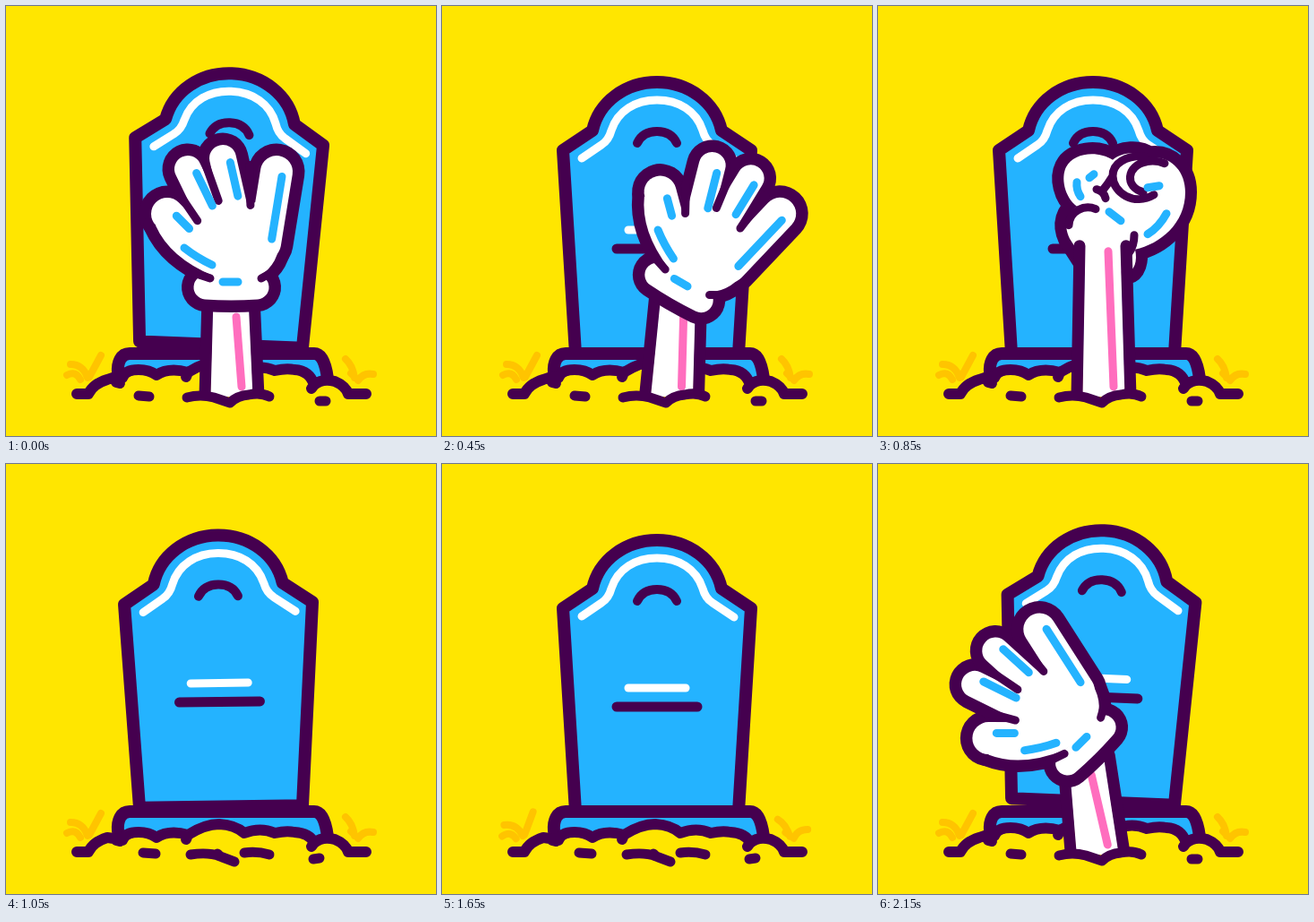
Animation, 480 px wide and 480 px high, one loop 2.2 s. Source, as an HTML page with a canvas:

```html
<!DOCTYPE html>
<html lang="en">
<head>
<meta charset="utf-8">
<title>Hand from the grave</title>
<style>
  html, body { margin: 0; width: 100%; height: 100%; overflow: hidden; background: #ffe600 }
  canvas { display: block; width: 480px; height: 480px }
</style>
</head>
<body>
<canvas id="stage" width="480" height="480"></canvas>
<script>
const LOOP = 2200, STEP = 50, BURST = 1700;
const YELLOW = '#ffe600', DARK = '#45004f', BLUE = '#24b3ff',
      WHITE = '#fff', PINK = '#ff6ebe', GRASS = '#ffc400';
const ctx = document.getElementById('stage').getContext('2d');
ctx.lineCap = ctx.lineJoin = 'round';

const stroke = (d, color, width) => {
  ctx.strokeStyle = color;
  ctx.lineWidth = width;
  ctx.stroke(new Path2D(d));
};
const fill = (d, color) => {
  ctx.fillStyle = color;
  ctx.fill(new Path2D(d));
};
const line = (a, b, color, width) => stroke(`M${a}L${b}`, color, width);
const mix = (a, b, u) => a.map((v, i) => v + (b[i] - v) * u);

// Runs fn in its own coordinate system.
function at(x, y, degrees, fn) {
  ctx.save();
  ctx.translate(x, y);
  ctx.rotate(degrees * Math.PI / 180);
  fn();
  ctx.restore();
}

// Smooth step from 0 to 1, and smooth bump 0-1-0, between two times.
const span = (t, a, b) => Math.min(1, Math.max(0, (t - a) / (b - a)));
const ramp = (t, a, b) => { const u = span(t, a, b); return u * u * (3 - 2 * u); };
const bump = (t, a, b) => Math.sin(Math.PI * span(t, a, b)) ** 2;

// All times below count from the moment the hand bursts out.
function pose(age) {
  const hop = bump(age, 1500, 1800);
  const waving = ramp(age, 230, 420) * (1 - ramp(age, 950, 1150));
  const swing = 30 * Math.exp((950 - age) / 750);
  const angle = -swing * Math.cos((age - 410) / 360 * 2 * Math.PI) * waving;
  return {
    stoneY: 11 * bump(age, 0, 300) - 11 * bump(age, 200, 700) - 22 * hop,
    tilt: 2.4 * bump(age, 50, 850) - 3 * hop,
    sway: 10 * bump(age, 0, 300) - 9 * (bump(age, 1850, 2350) + bump(age, -350, 150)),
    angle,
    bend: Math.abs(angle) * (.22 + .002 * angle),
    curl: 1 - ramp(age, 150, 250) + ramp(age, 1050, 1200),
    x: 251 + .42 * angle - 7 * bump(age, 0, 300),
    y: 520 - 205 * ramp(age, -10, 170) - 112 * bump(age, 70, 350)
       - 48 * bump(age, 1050, 1700) + 230 * ramp(age, 1400, 1570),
    foot: 252 + .15 * angle,
    closing: age > 800
  };
}

function drawGrass(sway) {
  at(92, 420, sway, () =>
    stroke('M-24-8Q-14-13-9-3M-20-20Q-6-20-1-5M14-30Q8-19 1-6', GRASS, 8));
  at(392, 420, sway * 1.2, () =>
    stroke('M-13-26Q-5-19-3-5M18-9Q7-11 1-2M-7-10L-3-6', GRASS, 8));
}

function drawStone(dy, tilt) {
  at(240, 388 + dy, tilt, () => {
    ctx.translate(-240, -388);
    const slab = 'M149 388L135 161L168 139C175 107 205 85 240 85S305 107 312 139L345 161L331 388Z';
    fill(slab, BLUE);
    stroke(slab, DARK, 14);
    stroke('M156 170L178 155Q186 150 189 139C196 117 216 105 240 105S284 117 291 139Q294 150 302 155L326 171', WHITE, 9);
    stroke('M218 153Q224 140 240 140T262 153', DARK, 10);
    stroke('M208 250H272', WHITE, 9);
    stroke('M195 271H285', DARK, 11);
  });
  at(0, Math.max(0, dy) * .9, 0, () => {
    const base = 'M125 410C124 398 128 388 138 388H344C353 388 357 400 359 416';
    fill(base, BLUE);
    stroke(base, DARK, 14);
  });
}

// The soil heaps up a little while the arm stands in it.
function drawMound(lift) {
  const y = v => v - lift;
  const ridge = `M79 433H92Q97 422 113 417Q123 ${y(418)} 130 ${y(420)}Q133 ${y(411)} 148 ${y(411)}`
    + `Q160 ${y(411)} 168 ${y(417)}Q182 ${y(408)} 203 ${y(414)}Q222 ${y(402)} 238 ${y(402)}`
    + `Q256 ${y(403)} 266 ${y(412)}Q284 ${y(405)} 300 ${y(412)}Q313 ${y(409)} 322 ${y(411)}`
    + `Q339 ${y(412)} 344 423Q353 415 367 419Q379 424 382 433H402`;
  fill(ridge + 'V447H79Z', YELLOW);
  stroke(ridge + `M203 ${y(414)}L201 ${y(419)}M344 423L341 427M127 421L123 420`, DARK, 12);
}

function drawFront(open) {
  stroke(open
    ? 'M202 437Q217 433 232 437L250 443Q258 435 271 434Q284 431 294 436M148 435L160 436M350 441H357'
    : 'M206 436Q226 433 239 438L255 444M236 435L239 438M266 434Q280 432 294 436M153 434L167 435M343 441L350 440',
    DARK, 11);
}

const FINGERS = [
  { tip: [-71, -83], base: [-30, -42], width: 36, give: 0, shine: .45 },
  { tip: [-48, -133], base: [-15, -65], width: 30, give: 1.2, shine: .65 },
  { tip: [-9, -145], base: [7, -75], width: 30, give: 1.7, shine: .65 },
  { tip: [51, -130], base: [38, -50], width: 36, give: .5, shine: 1 }
];

// Tip after bending about the base and curling towards it.
function bentTip({ tip, base, give }, bend, curl) {
  const a = bend * give * Math.PI / 180, s = 1 - curl * .6;
  const dx = (tip[0] - base[0]) * s, dy = (tip[1] - base[1]) * s;
  return [base[0] + dx * Math.cos(a) - dy * Math.sin(a),
          base[1] + dx * Math.sin(a) + dy * Math.cos(a)];
}

function drawOpenHand(bend, curl) {
  const fingers = FINGERS.map(f => ({ ...f, tip: bentTip(f, bend, curl) }));
  const palm = 'M-84-70Q-68-34-20-14Q8-8 32-14Q54-26 56-60L45-90L28-96L-6-88L-34-74Z';
  const cuff = 'M-28-1Q0 1 29-1';
  for (const f of fingers) line(f.tip, f.base, DARK, f.width + 27);
  stroke(palm, DARK, 27);
  stroke(cuff, DARK, 54);
  stroke(cuff, WHITE, 27);
  fill(palm, WHITE);
  for (const f of fingers) line(f.tip, f.base, WHITE, f.width);
  fingers.slice(1).forEach((f, i) => {
    const top = mix(fingers[i].tip, f.tip, .5), root = mix(fingers[i].base, f.base, .5);
    line(top, mix(top, root, .6), DARK, 9);
  });
  for (const { tip, base, shine } of fingers) {
    at(7, -1, 0, () => line(mix(tip, base, .08), mix(tip, base, shine * .95), BLUE, 9));
  }
  stroke('M-48-18Q-36-16-23-11M50-19Q42-16 34-11', DARK, 9);
  stroke('M-52-45Q-38-34-21-26M-9-7H8', BLUE, 9);
}

function drawFist(shape, creases, shine) {
  stroke(shape, DARK, 26);
  fill(shape, WHITE);
  stroke(creases, DARK, 9);
  stroke(shine, BLUE, 9);
}

const drawClosingFist = () => drawFist(
  'M214 262C206 245 212 232 222 226C208 215 204 194 210 182C218 166 245 163 262 174C272 165 292 164 302 172C326 168 343 186 343 210C343 245 315 268 287 274C290 287 286 298 278 300L232 290Z',
  'M308 213C286 226 262 211 262 192C262 178 276 169 298 170M296 210C275 205 277 180 300 176Q310 174 320 178M244 207Q252 209 254 217M262 192Q256 202 250 209M213 247C214 230 231 224 243 229M286 258Q286 270 280 278',
  'M236 194L241 190M222 199Q221 207 226 215M301 205L314 203M322 234Q314 249 301 257M258 232L271 242');

const drawRisingFist = () => drawFist(
  'M216 270C196 268 198 242 214 237L223 229C201 220 190 195 191 170C192 147 204 138 218 138C236 118 279 137 290 170C293 185 281 195 268 200Q261 211 261 223C285 225 290 245 278 256L266 270Z',
  'M206 216C212 186 224 162 246 153Q270 147 279 167Q280 181 264 198L257 209M216 134Q247 127 266 151M232 126C260 125 280 146 283 170M213 168L216 175M257 219L264 224M207 241Q212 235 221 233',
  'M215 152Q223 146 232 147M246 193L260 178M222 213L229 198M226 228L241 225');

function drawArm({ x, y, foot }, fist) {
  const top = fist ? y : y + 10;
  fill(`M${x - 20} ${top}H${x + 20}L${foot + 24} 436H${foot - 24}Z`, WHITE);
  stroke(`M${x - 26} ${top}L${foot - 30} 436M${x + 26} ${top}L${foot + 30} 436`, DARK, 13);
  const pinkTop = y + (fist ? 6 : 32);
  if (pinkTop < 424) line([x + 6, pinkTop], [foot + 11, 425], PINK, 9);
}

function drawHand(p) {
  const fist = p.curl > .6;
  ctx.save();
  ctx.beginPath();
  ctx.rect(0, 0, 480, 436);
  ctx.clip();
  if (fist) {
    if (p.closing) at(p.x - 251, p.y - 270, 0, drawClosingFist);
    else at(p.x - 244, p.y - 250, 0, drawRisingFist);
  }
  drawArm(p, fist);
  if (!fist) at(p.x, p.y, p.angle, () => drawOpenHand(p.bend, p.curl));
  ctx.restore();
}

// Clods of earth thrown up by the burst.
const random = n => { const v = Math.sin(n * 12.9898) * 43758.5453; return v - Math.floor(v); };

function drawClods(age) {
  const u = age / 150;
  if (u <= 0 || u > 2) return;
  const rise = u * (1.9 - .9 * u);
  ctx.fillStyle = DARK;
  for (let i = 0; i < 10; i++) {
    const reach = -125 + 22 * i, height = 95 + 60 * random(i + 1) + (i > 7 ? 80 : 0);
    ctx.beginPath();
    ctx.arc(245 + reach * u ** .6, 420 - height * rise, i % 2 ? 9 : 5, 0, 7);
    ctx.fill();
  }
}

function draw(t) {
  const age = (t - BURST + LOOP) % LOOP;
  const p = pose(age), out = p.y < 470;
  ctx.fillStyle = YELLOW;
  ctx.fillRect(0, 0, 480, 480);
  drawGrass(p.sway);
  drawStone(p.stoneY, p.tilt);
  drawMound(out ? 5 : 0);
  if (out) drawHand(p);
  drawFront(out);
  drawClods(age);
}

const start = performance.now();
function tick() {
  const t = (performance.now() - start) % LOOP;
  draw(Math.floor(t / STEP) * STEP);
  requestAnimationFrame(tick);
}
tick();
</script>
</body>
</html>
```
